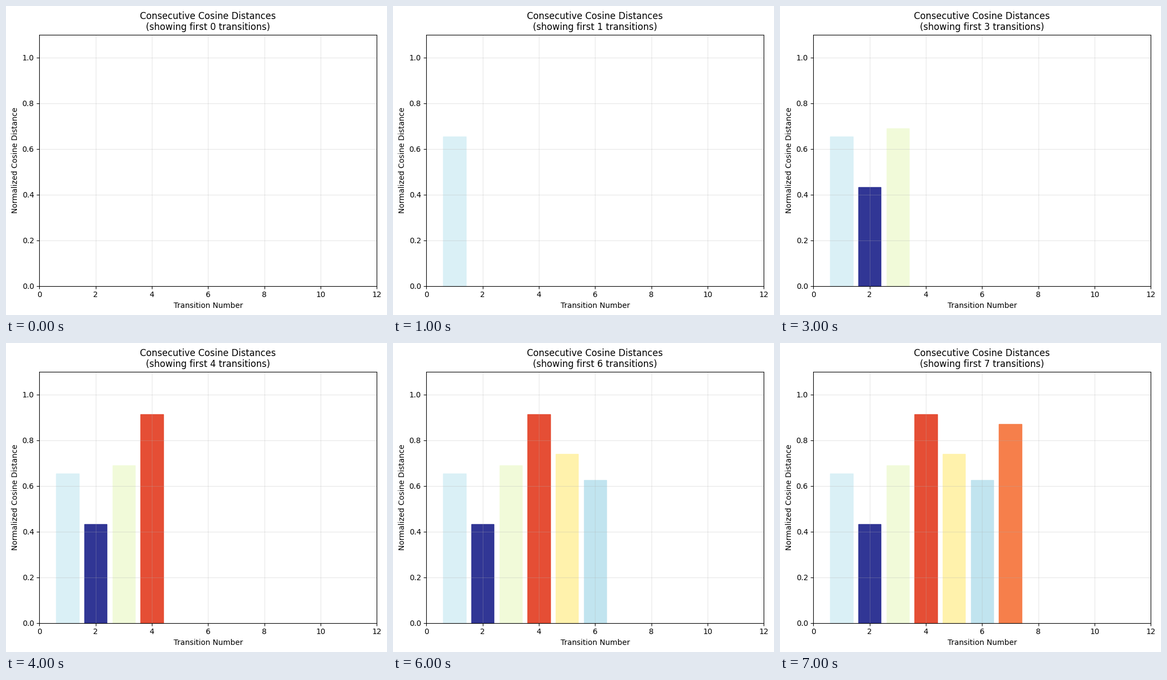
Write a matplotlib script that moves like this. It is 700x568 px and loops after 8 s.

```python
import matplotlib.pyplot as plt
from matplotlib.animation import FuncAnimation

W, H, DPI = 700, 568, 100
LEFT, BOTTOM = 61.28, 53.28          # axes corner in pixels
AX_W, AX_H = 620, 462

distances = [0.654, 0.4326, 0.690, 0.9136, 0.740, 0.6255, 0.8708]
norm = plt.Normalize(min(distances), 1.0)
cmap = plt.get_cmap("RdYlBu_r")
colors = [cmap(norm(d)) for d in distances]

plt.rcParams["font.family"] = "DejaVu Sans"
fig = plt.figure(figsize=(W / DPI, H / DPI), dpi=DPI, facecolor="white")
ax = fig.add_axes([LEFT / W, BOTTOM / H, AX_W / W, AX_H / H])

bars = ax.bar(range(1, len(distances) + 1), distances, width=0.8,
              color=colors, edgecolor=colors, linewidth=1.0)
ax.set_xlim(0, 12)
ax.set_ylim(0, 1.1)
ax.set_xticks(range(0, 13, 2))
ax.set_xlabel("Transition Number", fontsize=10)
ax.set_ylabel("Normalized Cosine Distance", fontsize=10)
ax.grid(True, alpha=0.3)
title = ax.set_title("", fontsize=12)


def update(count):
    for i, bar in enumerate(bars):
        bar.set_visible(i < count)
    title.set_text("Consecutive Cosine Distances\n"
                   f"(showing first {count} transitions)")
    return [*bars, title]


anim = FuncAnimation(fig, update, frames=len(distances) + 1,
                     init_func=lambda: update(0), interval=1000,
                     repeat=True, repeat_delay=0, blit=False)

plt.show()
```
